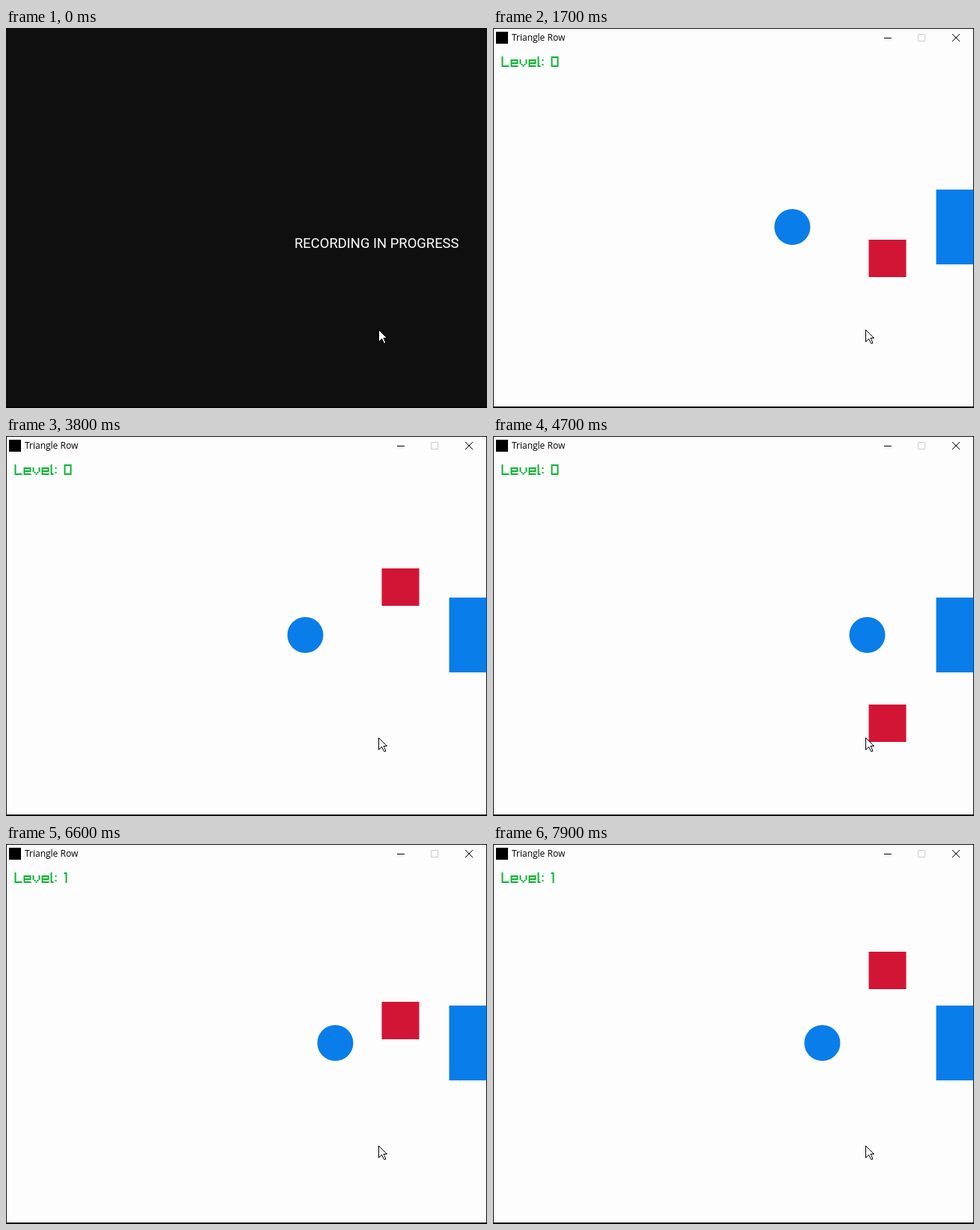
Animation, 642 px wide and 508 px high, one loop 8000 ms. Source, as an HTML page:

```html
<!DOCTYPE html>
<html lang="en">
<head>
<meta charset="utf-8">
<title>Triangle Row</title>
<style>
  html, body { margin: 0; width: 100%; height: 100%; overflow: hidden; background: #0f0f0f; }
  svg { display: block; }
  #intro { font: 18.4px Roboto, sans-serif; fill: #fff; }
  #title { font: 12px "Open Sans", "Noto Sans", sans-serif; fill: #000; }
</style>
</head>
<body>
<svg width="642" height="508" viewBox="0 0 642 508">
  <rect width="642" height="508" fill="#0f0f0f"/>
  <text id="intro" x="385" y="294">RECORDING IN PROGRESS</text>

  <g id="game">
    <rect x="1" y="1" width="640" height="505" fill="#fdfdfd"/>
    <!-- the playfield sits half a pixel to the right -->
    <g transform="translate(.5)">
      <rect x="591" y="216" width="50" height="100" fill="#097de9"/>
      <circle id="player" cy="266" r="24" fill="#097de9"/>
      <rect id="enemy" x="501" width="50" height="50" fill="#d21435"/>
      <path id="level" transform="translate(11 38) scale(2)" fill="none" stroke="#0cb433" stroke-linecap="square"/>
    </g>

    <!-- title bar -->
    <rect x="1" y="1" width="640" height="25" fill="#fdfdfd"/>
    <rect x="4" y="5" width="16" height="16"/>
    <text id="title" x="25" y="17">Triangle Row</text>
    <g fill="none" stroke="#000">
      <path d="M522 13.5h10"/>
      <path d="M567.5 8.5h9v9h-9z" stroke="#ccc"/>
      <path d="M613 8l10 10M623 8l-10 10"/>
    </g>
  </g>

  <rect y="506" width="642" height="2" fill="#050005"/>
  <path d="M497.5 403.5v16l4-4 3 6h2v-1.5l-2.5-5.5h4.5z" fill="#fff" stroke="#000"/>
</svg>
<script>
const LOOP = 8000, STEP = 100;
const START_X = 129, RUN_LENGTH = 440, RUN_SPEED = 0.4;
const TOP = 18, RANGE = 497, TOP_TIME = 3012, ENEMY_SPEED = 0.202;
const LEVEL_UP = 4875, SPEED_GAIN = 0.044;
const $ = id => document.getElementById(id);

// Pixel font: advance width and pen strokes
const glyphs = {
  'L': [6, 'v6h4'],
  'e': [6, 'm4 6h-4v-4h4v2h-4'],
  'v': [6, 'm0 2v2m1 1h0m1 1h0m1-1h0m1-1v-2'],
  'l': [3, 'v6h1'],
  ':': [2, 'm0 2h0m0 3h0'],
  ' ': [4, ''],
  '0': [6, 'h4v6h-4z'],
  '1': [3, 'h1v6']
};

function pixelText(text) {
  let x = 0.5, d = '';
  for (const ch of text) {
    const [advance, strokes] = glyphs[ch];
    d += `M${x} .5${strokes}`;
    x += advance;
  }
  return d;
}

// Time a key has been held between two moments
const held = (t, from, to) => Math.min(Math.max(t - from, 0), to - from);

function distanceRun(t) {
  const right = held(t, 500, 625) + held(t, 1050, 1600) + held(t, 4450, 5700);
  return RUN_SPEED * (right - held(t, 6330, 6380));
}

// The enemy bounces between top and bottom, faster after the level-up
function enemyY(t) {
  const d = ENEMY_SPEED * (t - TOP_TIME) + SPEED_GAIN * Math.max(0, t - LEVEL_UP);
  const lap = 2 * RANGE;
  return Math.round(TOP + Math.abs(d - lap * Math.round(d / lap)));
}

const start = performance.now();

function draw(now) {
  const t = Math.floor(Math.max(0, now - start) % LOOP / STEP) * STEP;
  const run = distanceRun(t);
  $('game').style.display = t ? '' : 'none';
  $('player').setAttribute('cx', START_X + run % RUN_LENGTH);
  $('enemy').setAttribute('y', enemyY(t));
  $('level').setAttribute('d', pixelText('Level: ' + Math.floor(run / RUN_LENGTH)));
  requestAnimationFrame(draw);
}
draw(start);
</script>
</body>
</html>
```
